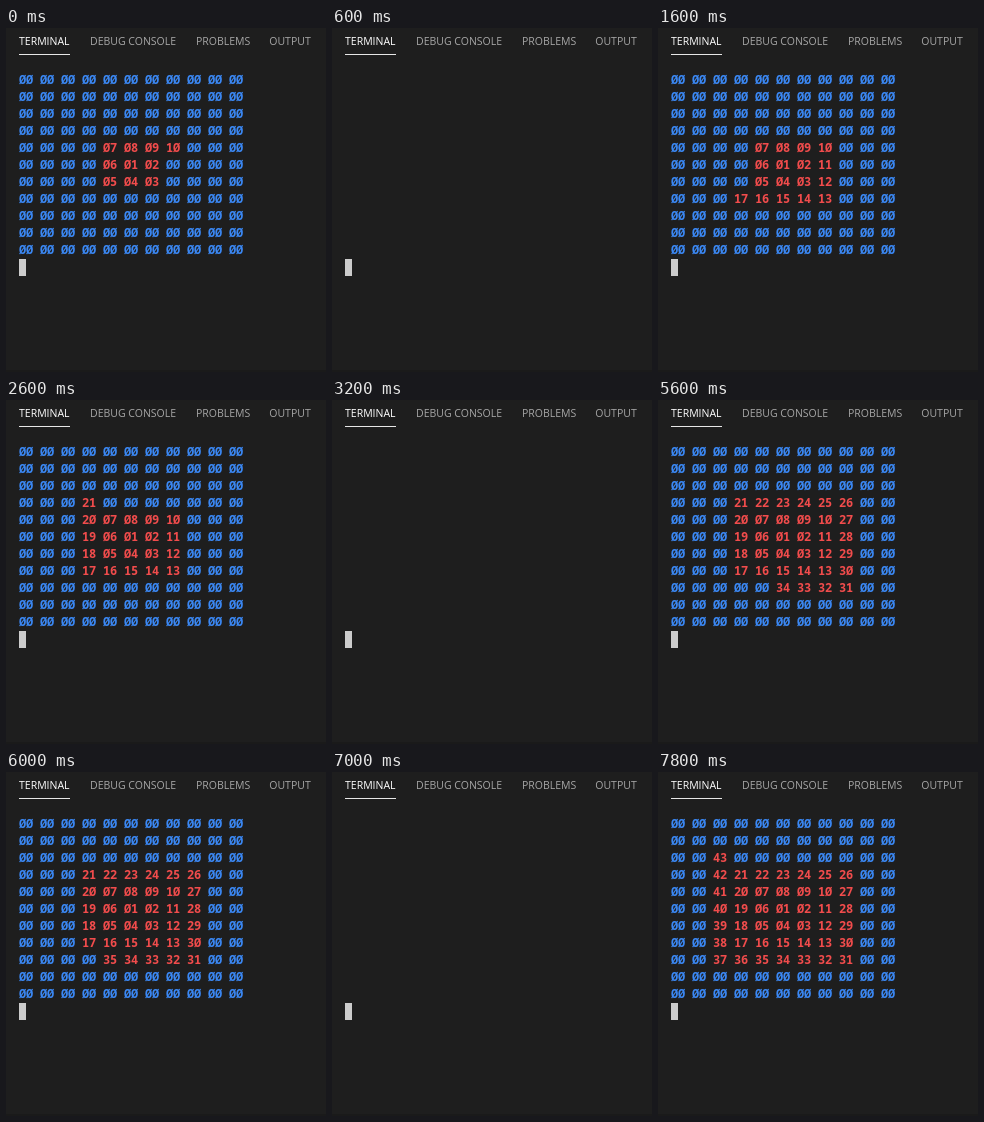
An HTML page with a canvas for the animation above (8 s loop, 320 by 344 pixels).

```html
<!DOCTYPE html>
<html lang="en">
<head>
<meta charset="utf-8">
<title>Number spiral in a terminal</title>
<style>
  html, body { margin: 0; width: 100%; height: 100%; overflow: hidden; background: #1e1e1e; }
  canvas { display: block; width: 320px; height: 344px; }
</style>
</head>
<body>
<canvas></canvas>
<script>
const canvas = document.querySelector('canvas');
const ctx = canvas.getContext('2d');
const ratio = window.devicePixelRatio || 1;
canvas.width = 320 * ratio;
canvas.height = 344 * ratio;
ctx.scale(ratio, ratio);

const SIZE = 11, LEFT = 13, CHAR = 7, LINE = 17;
const STEP = 200, STEPS = 40, FIRST = 10;
const BLANKS = [3, 10, 16, 22, 29, 35]; // steps caught while the screen is cleared
const TABS = [['TERMINAL', 13], ['DEBUG CONSOLE', 84], ['PROBLEMS', 190], ['OUTPUT', 263.3]];

// Clockwise spiral from the centre; every second turn lengthens the run.
function makeSpiral() {
  const grid = Array.from({ length: SIZE }, () => Array(SIZE).fill(0));
  let x = 5, y = 5, dx = 1, dy = 0, n = 1;
  for (let turn = 2; n <= SIZE * SIZE; turn++) {
    for (let run = turn >> 1; run > 0 && n <= SIZE * SIZE; run--) {
      grid[y][x] = n++;
      x += dx;
      y += dy;
    }
    [dx, dy] = [-dy, dx];
  }
  return grid;
}
const spiral = makeSpiral();

function rect(color, x, y, w, h) {
  ctx.fillStyle = color;
  ctx.fillRect(x, y, w, h);
}

function drawTabs() {
  ctx.font = '500 10.5px "Open Sans", "Noto Sans", sans-serif';
  ctx.textAlign = 'left';
  TABS.forEach(([label, x], i) => {
    ctx.fillStyle = i ? '#a6a6a6' : '#ffffff';
    ctx.fillText(label, x, 17);
  });
  rect('#e7e7e7', 13, 26, 51, 1);
}

// The terminal's zero has a slash that pokes out of the bowl.
function drawDigit(digit, x, y) {
  ctx.fillText(digit === '0' ? 'Ø' : digit, x + CHAR / 2, y);
}

function drawGrid(last) {
  ctx.font = '600 12px "Noto Sans Mono", monospace';
  ctx.textAlign = 'center';
  spiral.forEach((row, r) => row.forEach((n, c) => {
    const shown = n <= last;
    const [tens, ones] = String(shown ? n : 0).padStart(2, '0');
    const x = LEFT + c * CHAR * 3, y = 56 + r * LINE;
    ctx.fillStyle = shown ? '#f14c4c' : '#3b88f4';
    drawDigit(tens, x, y);
    drawDigit(ones, x + CHAR, y);
  }));
}

function draw(now) {
  const step = Math.floor(now / STEP) % STEPS;
  rect('#1e1e1e', 0, 0, 320, 344);
  rect('#1a1a1a', 0, 342, 320, 2);
  drawTabs();
  if (!BLANKS.includes(step)) {
    drawGrid(FIRST + step - BLANKS.filter(b => b < step).length);
  }
  rect('#cccccc', LEFT, 231, CHAR, LINE);
}

let start;
function tick(now) {
  start ??= now;
  draw(now - start);
  requestAnimationFrame(tick);
}
requestAnimationFrame(tick);
</script>
</body>
</html>
```
